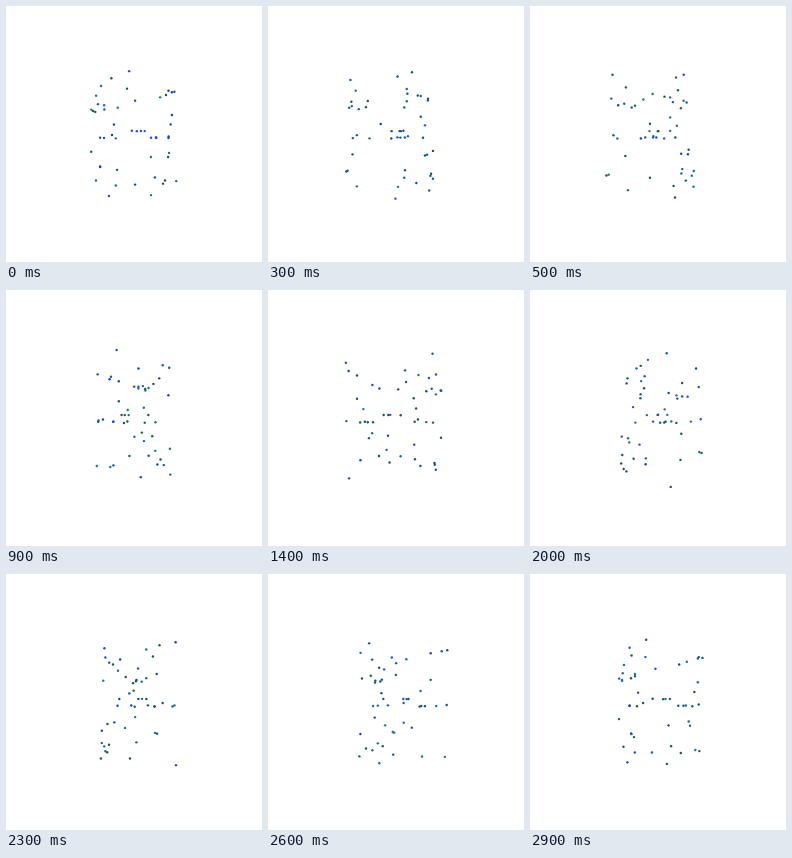
These frames come from a looping animation (256 px wide and 256 px high, 3000 ms). An HTML page with a canvas:

```html
<!DOCTYPE html>
<html lang="en">
<head>
<meta charset="utf-8">
<title>Turning point cloud</title>
<style>
  html, body { margin: 0; width: 100%; height: 100%; overflow: hidden; background: #fff; }
  canvas { display: block; width: 256px; height: 256px; }
</style>
</head>
<body>
<canvas id="stage" width="256" height="256"></canvas>
<script>
const LOOP = 3000, STEPS = 30, CENTER = 128, CAMERA = 210;
const COLORS = ['#1c50d0', '#12603c', '#17479c', '#1c6e94'];

// Each layer: height, then x, z pairs
const LAYERS = [
  [-54, -4.2, 29.5, -37, -26.5],
  [-49.5, 39.5, -30.5],
  [-48, -19.5, 29],
  [-45.5, 43.5, -16],
  [-43, 39, -6],
  [-40, -6.2, 24.7, -39.5, -9],
  [-36.2, 29.7, 15],
  [-33, 23.5, 21, -34.2, -30.5],
  [-30.8, 1, 16],
  [-29, -35, 6],
  [-25.2, -30.5, -6, -44.2, -7],
  [-24.5, -43.7, -14],
  [-22.4, -39.3, -3, -13.9, 31],
  [-19.5, 39, -6],
  [-9.4, 36, 4, -19.8, 3],
  [-3, -2, 14.6, 3, -12, 7, -3.5, 11, -6.5],
  [1.2, -25.7, -35.5],
  [2.8, 39.5, -29.5],
  [4, 34, 3, -37.2, -20.5, -30, 0, -16.8, 16, 18.4, -17, 25.3, -32, 24, -16],
  [17.1, 31.7, 20],
  [18.3, -44, -6],
  [20.2, 14.8, 26],
  [21.8, 32.3, 11],
  [30.3, -14.3, 32.5],
  [37, -38.7, -29.5, 17.8, 31],
  [38, -39, -32],
  [43.5, 0.9, 29.5, 25.4, 26],
  [45.4, -16, 25, 40.7, 7.5],
  [48, -39.3, -7],
  [51.8, 14.4, 32],
  [53.5, 35.7, -32, -21.6, 29]
];

const points = LAYERS.flatMap(([y, ...xz]) =>
  xz.flatMap((x, i) => i % 2 ? [] : [{ x, y, z: xz[i + 1] }]));

const ctx = document.getElementById('stage').getContext('2d');

const hash = (a, b) => {
  const n = Math.sin(a * 12.99 + b * 78.23) * 43758.55;
  return n - Math.floor(n);
};

function draw(step) {
  const turn = step / STEPS * Math.PI * 2;
  const cos = Math.cos(turn), sin = Math.sin(turn);
  ctx.fillStyle = '#fff';
  ctx.fillRect(0, 0, 256, 256);
  points.forEach(({ x, y, z }, i) => {
    const scale = CAMERA / (CAMERA - (z * cos - x * sin));
    ctx.fillStyle = COLORS[Math.floor(hash(i, step) * COLORS.length)];
    ctx.beginPath();
    ctx.arc(CENTER + (x * cos + z * sin) * scale, CENTER + y * scale, 1.2, 0, Math.PI * 2);
    ctx.fill();
  });
}

const start = performance.now();
function tick() {
  const time = (performance.now() - start) % LOOP;
  draw(Math.floor(time / LOOP * STEPS));
  requestAnimationFrame(tick);
}
tick();
</script>
</body>
</html>
```
